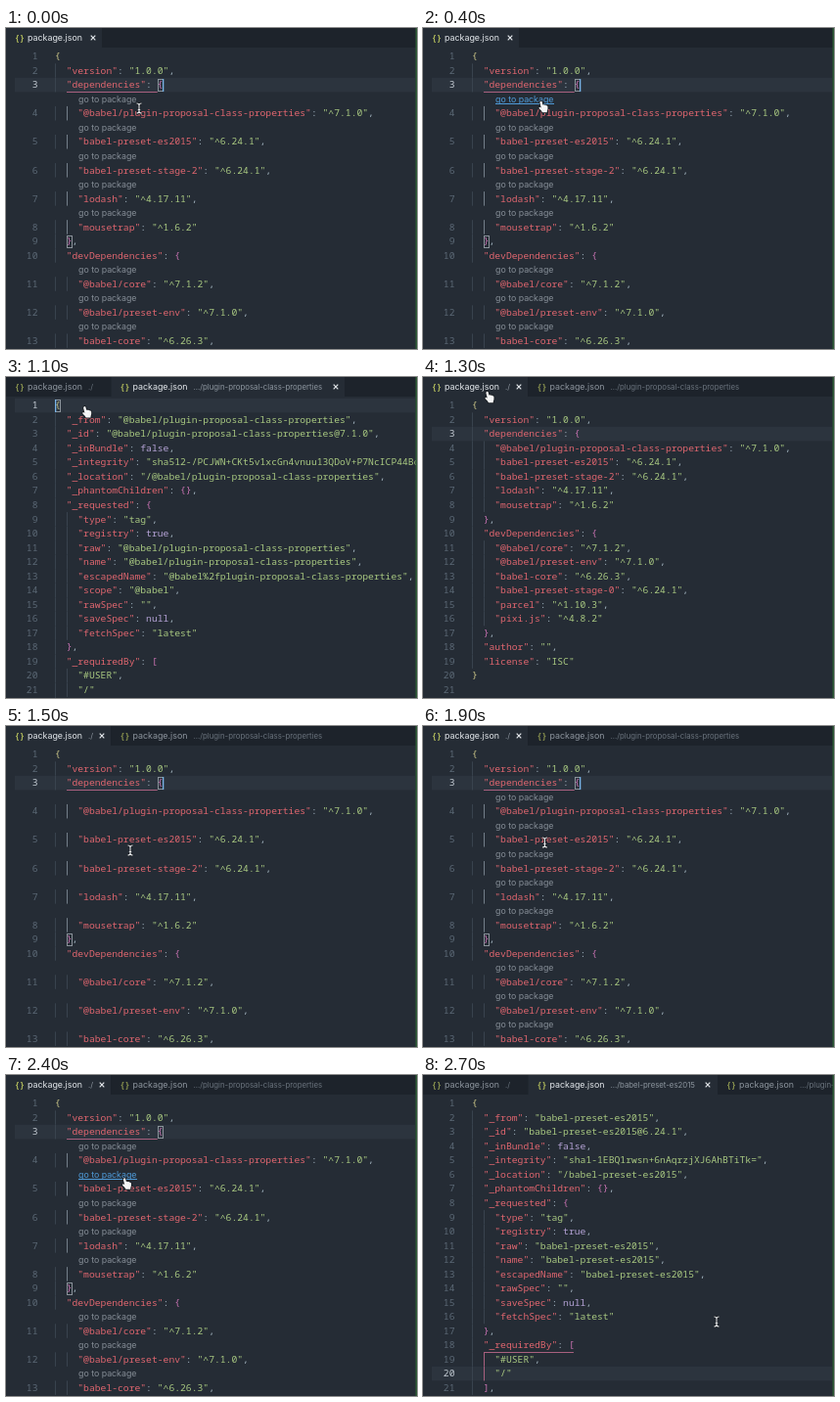
Write an HTML page with a canvas that moves like this. It is 420 px wide and 328 px high and loops after 2.8 s.

```html
<!DOCTYPE html>
<html lang="en">
<head>
<meta charset="utf-8">
<title>Go to package</title>
<style>
html, body { margin: 0; width: 100%; height: 100%; overflow: hidden; background: #252c35; }
canvas { display: block; width: 420px; height: 328px; }
</style>
</head>
<body>
<canvas id="stage" width="420" height="328"></canvas>
<script>
const ctx = document.getElementById('stage').getContext('2d');
const LOOP = 2800, CHAR = 5.82, ROW = 14.53, LEFT = 50, TOP = 29;
const MONO = '"Noto Sans Mono", "DejaVu Sans Mono", monospace';
const SANS = 'Inter, Roboto, sans-serif';
const C = {
  bg: '#252c35', bar: '#1d232b', line: '#2c343e', num: '#5b6875', numOn: '#c3cbd3',
  key: '#e0666f', str: '#a9c981', word: '#b5a3d6', punct: '#a3b4c0',
  outer: '#cfc98a', inner: '#cb74b4', guide: '#39434e', guideOn: '#737f8a',
  scope: '#a8607f', lens: '#858d96', link: '#4f9bd9', edge: '#2c5a35',
  tabOn: '#e4e8ec', tabOff: '#8d959e', path: '#69727c', icon: '#b3bd5c'
};

const root = `{
  "version": "1.0.0",
  "dependencies": {
    "@babel/plugin-proposal-class-properties": "^7.1.0",
    "babel-preset-es2015": "^6.24.1",
    "babel-preset-stage-2": "^6.24.1",
    "lodash": "^4.17.11",
    "mousetrap": "^1.6.2"
  },
  "devDependencies": {
    "@babel/core": "^7.1.2",
    "@babel/preset-env": "^7.1.0",
    "babel-core": "^6.26.3",
    "babel-preset-stage-0": "^6.24.1",
    "parcel": "^1.10.3",
    "pixi.js": "^4.8.2"
  },
  "author": "",
  "license": "ISC"
}
`.split('\n');

function manifest(name, version, hash, scope) {
  const escaped = name.replace('/', '%2f');
  return [
    '{',
    `  "_from": "${name}",`,
    `  "_id": "${name}@${version}",`,
    '  "_inBundle": false,',
    `  "_integrity": "${hash}",`,
    `  "_location": "/${name}",`,
    '  "_phantomChildren": {},',
    '  "_requested": {',
    '    "type": "tag",',
    '    "registry": true,',
    `    "raw": "${name}",`,
    `    "name": "${name}",`,
    `    "escapedName": "${escaped}",`,
    ...(scope ? [`    "scope": "${scope}",`] : []),
    '    "rawSpec": "",',
    '    "saveSpec": null,',
    '    "fetchSpec": "latest"',
    '  },',
    '  "_requiredBy": [',
    '    "#USER",',
    '    "/"',
    '  ],'
  ];
}
const plugin = manifest('@babel/plugin-proposal-class-properties', '7.1.0',
  'sha512-/PCJWN+CKt5v1xcGn4vnuu13QDoV+P7NcICP44BoTJzU2x', '@babel');
const preset = manifest('babel-preset-es2015', '6.24.1', 'sha1-1EBQ1rwsn+6nAqrzjXJ6AhBTiTk=');

function rect(color, x, y, w, h) {
  ctx.fillStyle = color;
  ctx.fillRect(x, y, w, h);
}

function text(str, x, y, size, color, family = SANS, weight = 400) {
  ctx.font = `${weight} ${size}px ${family}`;
  ctx.fillStyle = color;
  ctx.fillText(str, x, y);
}

function mono(str, x, y, color) {
  [...str].forEach((ch, i) => {
    if (ch !== ' ') text(ch, x + i * CHAR, y + 3.3, 9.7, color, MONO);
  });
}

function tokenColor(tok, rest, indent) {
  if (tok[0] === '"') return rest[0] === ':' ? C.key : C.str;
  if (/[{}[\]]/.test(tok)) return indent ? C.inner : C.outer;
  return /[a-z]/.test(tok) ? C.word : C.punct;
}

function codeLine(line, y) {
  const indent = line.search(/\S/);
  for (const m of line.matchAll(/"[^"]*"|[a-z]+|[{}[\]]+|[:,]/g)) {
    const rest = line.slice(m.index + m[0].length);
    mono(m[0], LEFT + m.index * CHAR, y, tokenColor(m[0], rest, indent));
  }
}

function bracketBox(x, y) {
  ctx.strokeStyle = '#8b939b';
  ctx.lineWidth = 1;
  ctx.strokeRect(Math.round(x) + .5, Math.round(y - 6) + .5, 5, 12);
}

// lens: 'none' | 'blank' | 'shown'
function editor(lines, { active, lens = 'none', hover = -1, scope, caret }) {
  let row = 0, lensIndex = 0;
  const ys = [];
  lines.forEach((line, i) => {
    const indent = Math.max(0, line.search(/\S/));
    if (lens !== 'none' && indent === 4) {
      const y = TOP + row++ * ROW, on = lensIndex++ === hover;
      if (lens === 'shown') {
        text('go to package', 74, y + 3, 8.8, on ? C.link : C.lens);
        if (on) rect(C.link, 74, Math.round(y + 4), 60, 1);
      }
    }
    const y = ys[i] = TOP + row++ * ROW, on = i + 1 === active;
    if (on) rect(C.line, 9, y - 7.2, 409, ROW);
    const n = String(i + 1);
    mono(n, 32.5 - n.length * CHAR, y, on ? C.numOn : C.num);
    for (let g = 0; g < indent; g += 2) {
      const lit = scope && g === 2 && i > scope[0] && i < scope[1];
      rect(lit ? (scope[2] ? C.scope : C.guideOn) : C.guide, g ? 62 : 50, y - 7.2, 1, ROW);
    }
    codeLine(line, y);
  });
  if (scope) {
    const [open, close, plain] = scope;
    const x = LEFT + (lines[open].length - 1) * CHAR;
    rect(C.scope, 62, Math.round(ys[open] + 7), x - 62 + (plain ? 5 : 0), 1);
    if (!plain) {
      bracketBox(x, ys[open]);
      bracketBox(62, ys[close]);
      if (caret) rect('#78b4e8', 160, ys[open] - 6, 1.3, 13);
    }
  } else if (caret) {
    bracketBox(LEFT, ys[0]);
    rect('#78b4e8', 50, ys[0] - 6, 1.3, 13);
  }
}

function tab(x, w, path, on, closeX) {
  rect(on ? C.bg : C.bar, x, 0, w, 20);
  ctx.globalAlpha = on ? 1 : .75;
  text('{}', x + 9, 12.6, 8.3, C.icon, MONO, 700);
  ctx.globalAlpha = 1;
  text('package.json', x + 22, 13, 8.9, on ? C.tabOn : C.tabOff);
  if (path) text(path, x + 84, 13, 7.8, on ? '#8d969f' : C.path);
  if (!closeX) return;
  ctx.strokeStyle = C.tabOn;
  ctx.lineWidth = 1.2;
  ctx.beginPath();
  ctx.moveTo(closeX - 2.3, 7.7); ctx.lineTo(closeX + 2.3, 12.3);
  ctx.moveTo(closeX + 2.3, 7.7); ctx.lineTo(closeX - 2.3, 12.3);
  ctx.stroke();
}

const PLUGIN_PATH = '.../plugin-proposal-class-properties';
function tabs(view) {
  rect(C.bar, 0, 0, 420, 20);
  if (view === 'start') return tab(0, 98, '', true, 89);
  const home = view === 'root';
  tab(0, 107, './', home, home && 98);
  if (view === 'preset') {
    tab(107.5, 193.5, '.../babel-preset-es2015', true, 291);
    tab(301, 119, PLUGIN_PATH, false);
  } else {
    tab(107.5, 238.5, PLUGIN_PATH, !home, !home && 337);
  }
}

function beam(x, y) {
  const path = new Path2D(`M${x - 2.5} ${y - 5}q2.5 0 2.5 2v6q0 2 -2.5 2M${x + 2.5} ${y - 5}q-2.5 0 -2.5 2v6q0 2 2.5 2M${x - 1.2} ${y + 1.5}h2.4`);
  ctx.lineWidth = 2.4; ctx.strokeStyle = '#14181d'; ctx.stroke(path);
  ctx.lineWidth = 1.1; ctx.strokeStyle = '#e6e8ea'; ctx.stroke(path);
}

function hand(x, y) {
  const path = new Path2D(`M${x} ${y}q1.2 -.7 1.7 .5l.7 3q1.3 -.7 1.8 .3q1.3 -.6 1.7 .4q1.5 -.3 1.6 1.2q.3 2.5 -.7 4.6v1.3h-4.8q-1 -2 -3.2 -3.8q-1 -1.5 .6 -1.7l1.3 .8l-1.3 -5q-.1 -1.1 .6 -1.6z`);
  ctx.lineWidth = 1.5; ctx.strokeStyle = '#14181d'; ctx.stroke(path);
  ctx.fillStyle = '#f4f5f6'; ctx.fill(path);
}

// time, x, y of the pointer hot spot
const trail = [
  [0, 136, 82], [200, 134, 81], [400, 120, 75], [600, 120, 75], [800, 121, 75],
  [900, 119, 71], [1200, 66, 16], [1300, 65, 15], [1500, 127, 127], [1800, 126, 124],
  [2100, 120, 105], [2200, 119, 104], [2500, 121, 106], [2700, 300, 252], [2800, 300, 252]
];
function pointer(t) {
  const i = trail.findIndex(p => p[0] > t);
  const [t0, x0, y0] = trail[i - 1], [t1, x1, y1] = trail[i];
  const k = (t - t0) / (t1 - t0), e = k * k * (3 - 2 * k);
  return [x0 + (x1 - x0) * e, y0 + (y1 - y0) * e];
}

// start time, view, pointer shape, editor state
const deps = [2, 8];
const steps = [
  [0, 'start', beam, { active: 3, lens: 'shown', scope: deps, caret: true }],
  [300, 'start', hand, { active: 3, lens: 'shown', scope: deps, caret: true, hover: 0 }],
  [600, 'plugin', beam, { active: 1, caret: true }],
  [1100, 'plugin', hand, { active: 1, caret: true }],
  [1200, 'root', hand, { active: 3 }],
  [1400, 'root', beam, { active: 3, lens: 'blank', scope: deps, caret: true }],
  [1600, 'root', beam, { active: 3, lens: 'shown', scope: deps, caret: true }],
  [2100, 'root', hand, { active: 3, lens: 'shown', scope: deps, hover: 1 }],
  [2500, 'preset', beam, { active: 20, scope: [17, 20, true] }]
];

function draw(t) {
  const [, view, cursor, state] = steps.filter(s => s[0] <= t).pop();
  rect(C.bg, 0, 0, 420, 328);
  editor({ plugin, preset }[view] || root, state);
  tabs(view);
  rect(C.edge, 418.5, 0, 1.5, 328);
  cursor(...pointer(t));
}

let last = -1;
const begin = performance.now();
function tick() {
  const t = Math.floor(((performance.now() - begin) % LOOP) / 100) * 100;
  if (t !== last) draw(last = t);
  requestAnimationFrame(tick);
}
tick();
</script>
</body>
</html>
```
